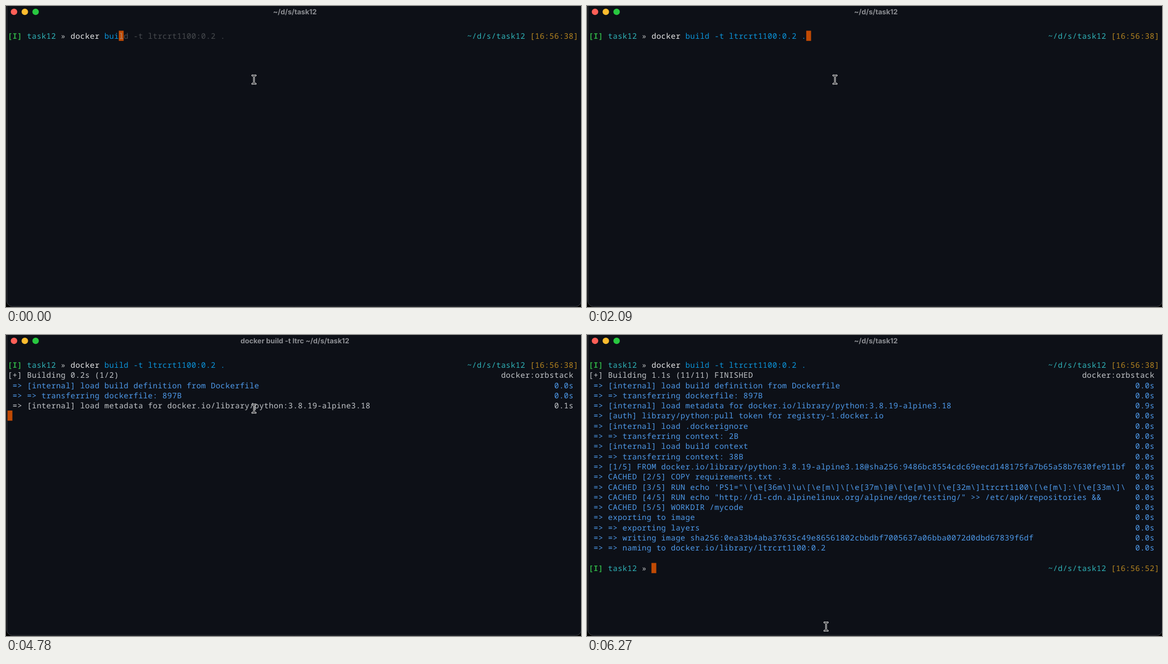
An HTML page with a canvas that plays this animation: 1033 px wide and 542 px high, repeating every 8 s.

```html
<!DOCTYPE html>
<html lang="en">
<head>
<meta charset="utf-8">
<title>Terminal build</title>
<style>
  html, body { margin: 0; width: 100%; height: 100%; overflow: hidden; background: #000; }
  canvas { display: block; width: 1033px; height: 542px; }
</style>
</head>
<body>
<canvas id="stage" width="1033" height="542"></canvas>
<script>
const ctx = document.getElementById("stage").getContext("2d");
ctx.textRendering = "geometricPrecision";
const LOOP = 8000;
const CELL_W = 8.69, CELL_H = 18.3, LEFT = 2.8, TOP = 44.5, BASELINE = 14.4;
const COLOR = {
  bg: "#0d1017", border: "#3d4046", title: "#8c8e93",
  green: "#2fae45", cyan: "#2fb4b9", arrow: "#b4b6b8", white: "#e9eaeb",
  blue: "#0b96dd", ghost: "#484b4f", time: "#b58520",
  output: "#c4c7cb", done: "#4f9bec", block: "#c04a04", covered: "#b08a70"
};

const COMMAND = "docker build -t ltrcrt1100:0.2 .";
const COMMAND_COL = 13;

const LINES = [
  ["[internal] load build definition from Dockerfile"],
  ["=> transferring dockerfile: 897B"],
  ["[internal] load metadata for docker.io/library/python:3.8.19-alpine3.18"],
  ["[auth] library/python:pull token for registry-1.docker.io"],
  ["[internal] load .dockerignore"],
  ["=> transferring context: 2B"],
  ["[internal] load build context"],
  ["=> transferring context: 38B"],
  ["[1/5] FROM docker.io/library/python:3.8.19-alpine3.18@sha256:9486bc8554cdc69eecd148175fa7b65a58b7630fe911bf"],
  ["CACHED [2/5] COPY requirements.txt ."],
  [String.raw`CACHED [3/5] RUN echo 'PS1="\[\e[36m\]\u\[\e[m\]\[\e[37m\]@\[\e[m\]\[\e[32m\]ltrcrt1100\[\e[m\]:\[\e[33m\]` + "\\"],
  [`CACHED [4/5] RUN echo "${"http:"}//dl-cdn.alpinelinux.org/alpine/edge/testing/" >> /etc/apk/repositories &&`],
  ["CACHED [5/5] WORKDIR /mycode"],
  ["exporting to image"],
  ["=> exporting layers"],
  ["=> writing image sha256:0ea33b4aba37635c49e86561802cbbdbf7005637a06bba0072d0dbd67839f6df"],
  ["=> naming to docker.io/library/ltrcrt1100:0.2"]
].flat();
const METADATA = 2, AUTH = 3;

// Each list holds [start time, value...]; the latest started entry applies.
const TYPING = [[0, 10], [300, 12], [1050, 13], [1200, 14], [1350, 15], [1490, 16], [2090, 32]];
const BUILD = [
  [4480, "0.0s (0/1)", 0],
  [4780, "0.2s (1/2)", 3, "0.1s"],
  [4930, "0.3s (1/2)", 3, "0.2s"],
  [5080, "0.5s (1/3)", 4, "0.4s"],
  [5220, "0.6s (2/3)", 4, "0.6s"],
  [5370, "0.8s (2/3)", 4, "0.8s"],
  [5520, "1.1s (11/11) FINISHED", 17, "0.9s"]
];
const POINTER = [
  [0, 445.5, 132.5], [5370, 390.5, 233.5], [5520, 410.5, 360.5], [5670, 442.5, 511],
  [5820, 442.5, 507], [5970, 436.5, 520], [6120, 430.5, 525], [6270, 429.5, 525]
];
const SUBMIT = 3880, METADATA_DONE = 5520, AUTH_DONE = 5220, FINISH = 5670;

const current = (steps, t) => steps.filter(step => step[0] <= t).pop();
const cellX = col => LEFT + col * CELL_W;
const cellY = row => TOP + row * CELL_H;

function write(text, col, row, color, bold = false) {
  ctx.font = `${bold ? "bold " : ""}13.8px "Noto Sans Mono", monospace`;
  ctx.textAlign = "center";
  ctx.fillStyle = color;
  [...text].forEach((char, i) => {
    if (char !== " ") ctx.fillText(char, cellX(col + i + 0.5), cellY(row) + BASELINE);
  });
}

function writeRight(text, endCol, row, color) {
  write(text, endCol - text.length, row, color);
}

function drawBlock(col, row) {
  ctx.fillStyle = COLOR.block;
  ctx.fillRect(cellX(col), cellY(row), CELL_W, CELL_H);
}

function drawWindow(title) {
  ctx.fillStyle = "#000";
  ctx.fillRect(0, 0, 1033, 542);
  ctx.beginPath();
  ctx.roundRect(1.5, -20, 1032, 561, 10);
  ctx.fillStyle = COLOR.bg;
  ctx.fill();
  ctx.strokeStyle = COLOR.border;
  ctx.lineWidth = 1;
  ctx.stroke();

  ["#ff5f57", "#febc2e", "#28c840"].forEach((color, i) => {
    ctx.beginPath();
    ctx.arc(14.4 + i * 19.4, 10.5, 5.8, 0, Math.PI * 2);
    ctx.fillStyle = color;
    ctx.fill();
  });

  ctx.font = "bold 12.7px Inter, sans-serif";
  ctx.textAlign = "center";
  ctx.fillStyle = COLOR.title;
  ctx.fillText(title, 519, 14.8);
}

function drawPrompt(row, clock) {
  write("[I]", 0, row, COLOR.green, true);
  write("task12", 4, row, COLOR.cyan);
  write("»", 11, row, COLOR.arrow);
  write("~/d/s/task12", 95, row, COLOR.cyan);
  write(`[${clock}]`, 108, row, COLOR.time);
}

function drawCommand(t) {
  const typed = current(TYPING, t)[1];
  const cursorCol = COMMAND_COL + typed;
  write(COMMAND.slice(0, 6), COMMAND_COL, 0, COLOR.white);
  write(COMMAND.slice(6, typed), COMMAND_COL + 6, 0, COLOR.blue);
  write(COMMAND.slice(typed), cursorCol, 0, COLOR.ghost);
  if (t < SUBMIT) {
    drawBlock(cursorCol, 0);
    write(COMMAND.charAt(typed), cursorCol, 0, COLOR.covered);
  }
}

function drawBuild(t) {
  const [, status, count, metadataTime] = current(BUILD, t);
  write(`[+] Building ${status}`, 0, 1, COLOR.output);
  writeRight("docker:orbstack", 117, 1, COLOR.output);
  LINES.slice(0, count).forEach((text, i) => {
    const running = (i === METADATA && t < METADATA_DONE) || (i === AUTH && t < AUTH_DONE);
    const color = running ? COLOR.output : COLOR.done;
    write("=> " + text, 1, i + 2, color);
    writeRight(i === METADATA ? metadataTime : "0.0s", 117, i + 2, color);
  });
  return count + 2;
}

function drawPointer(x, y) {
  ctx.beginPath();
  for (const side of [-1, 1]) {
    ctx.moveTo(x + side * 3, y - 7.5);
    ctx.quadraticCurveTo(x, y - 7.5, x, y - 5);
    ctx.lineTo(x, y + 5);
    ctx.quadraticCurveTo(x, y + 7.5, x + side * 3, y + 7.5);
  }
  ctx.lineCap = "round";
  ctx.lineJoin = "round";
  ctx.lineWidth = 3;
  ctx.strokeStyle = "#f2f2f2";
  ctx.stroke();
  ctx.lineWidth = 1.1;
  ctx.strokeStyle = "#08090c";
  ctx.stroke();
}

function draw(t) {
  const running = t >= SUBMIT && t < FINISH;
  drawWindow(running ? "docker build -t ltrc ~/d/s/task12" : "~/d/s/task12");
  drawPrompt(0, "16:56:38");
  drawCommand(t);
  const nextRow = t >= BUILD[0][0] ? drawBuild(t) : 1;
  if (running) drawBlock(0, nextRow);
  if (t >= FINISH) {
    drawPrompt(20, "16:56:52");
    drawBlock(COMMAND_COL, 20);
  }
  const [, x, y] = current(POINTER, t);
  drawPointer(x, y);
}

const start = performance.now();
function tick() {
  draw((performance.now() - start) % LOOP);
  requestAnimationFrame(tick);
}
tick();
</script>
</body>
</html>
```
